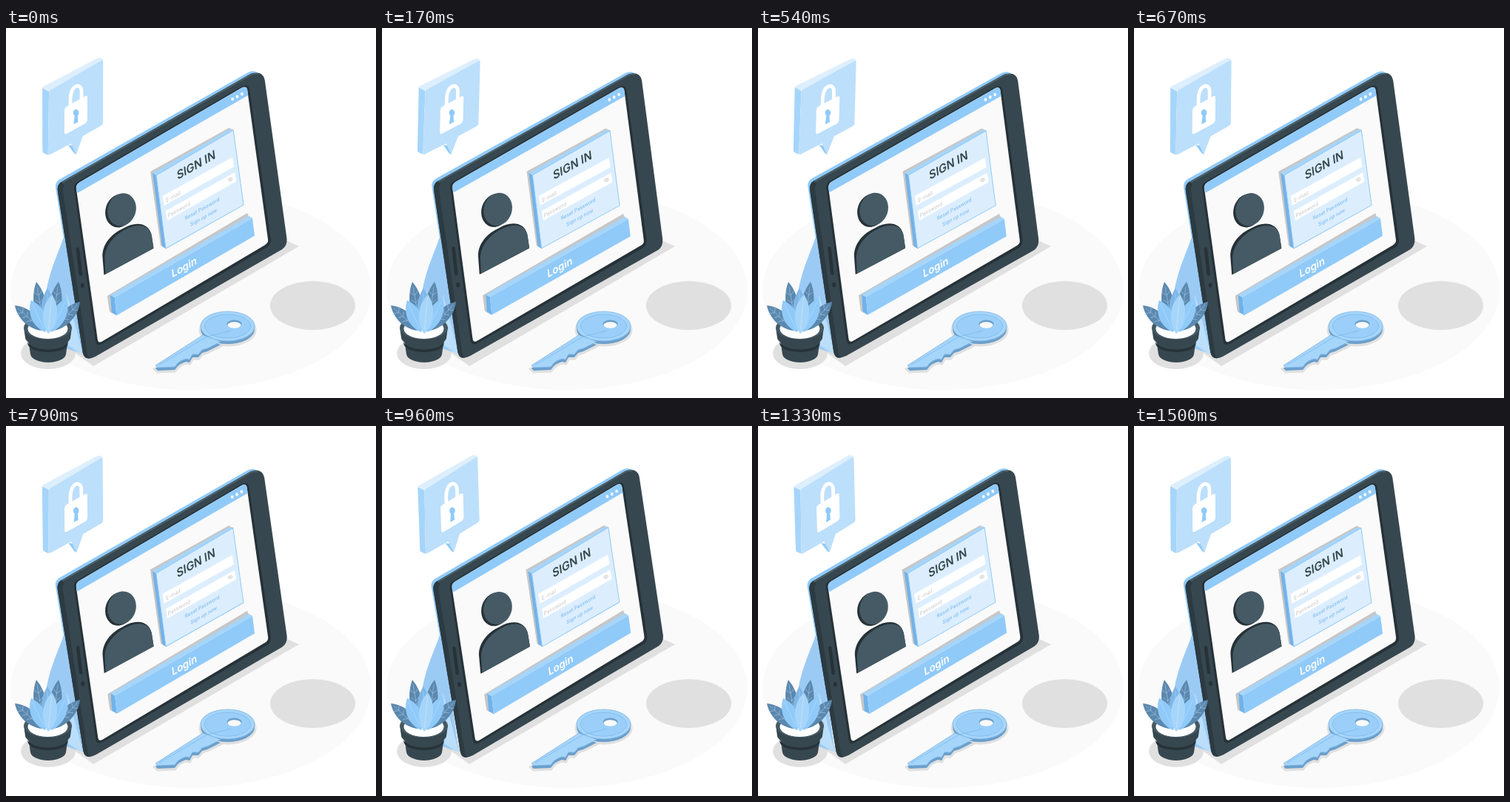
An HTML page for the animation above (1540 ms loop, 500 by 500 pixels).

```html
<!DOCTYPE html>
<html lang="en">
<head>
<meta charset="utf-8">
<title>Sign in</title>
<style>
  html, body { margin: 0; width: 100%; height: 100%; overflow: hidden; background: #fff; }
  svg { display: block; width: 100vw; height: 100vh; }
  text { font-family: Inter, Roboto, sans-serif; }
</style>
</head>
<body>
<svg viewBox="0 0 500 500">
  <ellipse cx="250" cy="354" rx="244" ry="135" fill="#fafafa"/>
  <g fill="#e0e0e0">
    <ellipse cx="414.5" cy="375" rx="57.5" ry="33"/>
    <ellipse cx="57" cy="439.500" rx="37" ry="21.500"/>
    <path d="M92 438 L118 457 L396 295 L376 286 Z"/>
  </g>

  <!-- stand -->
  <path d="M80 276 C74 298 60 322 54 358 L60 425 L90 436 L104 440 Z" fill="#9bcbf5"/>
  <path d="M82 360 L88 380 L104 441 L96 437 L84 429 Z" fill="#bbdefb"/>

  <g id="tablet">
    <path d="M67 216 Q66 209 72 205 L327 60 Q335 56 341 61 L346 70 L80 236 L83 290 L79 290 Z" fill="#90caf9"/>
    <path d="M70 222 Q68 212 75 208 L331 61.500 Q347 57 349.500 70 L379.500 284 Q380.500 294 373 299 L121 444 Q107 451 104 439 Z" fill="#37474f"/>
    <path d="M70 222 Q68 212 75 208 L79 212 Q76 215 77 222 L110 440 Q111 445 115 446 Q106 449 104 439 Z" fill="#2c3a41"/>
    <path d="M76 209 L332 62.500 Q336 61 340 62" fill="none" stroke="#50636c" stroke-width="1.500"/>
    <path d="M92 217 Q91 211 97 208 L318 79 Q328 74 329 84 L358 286 Q358 293 353 296 L130 427 Q122 431 121 423 Z" fill="#263238"/>
    <path d="M95 218 Q94 212 99 209 L318 81 Q325 77 326 84 L354 285 Q355 290 350 293 L131 423 Q125 427 124 421 Z" fill="#fafafa"/>
    <path d="M95.500 221 L95 217 Q95 212 99 209 L318 81 Q325 77 326 84 L327 91 L97 223 Z" fill="#90caf9"/>
    <g fill="#fff">
      <ellipse cx="306" cy="96" rx="1.900" ry="2.200"/>
      <ellipse cx="312.300" cy="92.700" rx="1.900" ry="2.200"/>
      <ellipse cx="318.700" cy="89" rx="1.900" ry="2.200"/>
    </g>
    <path d="M97 299 L101 333" stroke="#263238" stroke-width="4.500" stroke-linecap="round"/>
    <ellipse cx="103.500" cy="348" rx="2.500" ry="3.200" fill="#263238"/>

    <!-- user -->
    <ellipse cx="153.500" cy="247" rx="19" ry="23" transform="rotate(18 153.500 247)" fill="#263238"/>
    <ellipse cx="156.500" cy="245.500" rx="19" ry="22.500" transform="rotate(18 156.500 245.500)" fill="#455a64"/>
    <g transform="translate(.5 .8)">
      <path d="M132 333 L130 309 C129 292 142 277 158 270 C174 260 192 262 196 278 L199 297 Z" fill="#263238"/>
      <path d="M134 332 L133 311 C133 294 145 280 160 272 C176 263 193 264 196.500 280 L199 297 Z" fill="#455a64"/>
    </g>

    <!-- form -->
    <path d="M195 194 L301 135 L308 138 L204 200 L216 298 L209 294 Z" fill="#c7c7c7"/>
    <path d="M198 196 L203 199 L216 298 L211 295 Z" fill="#73b2e8"/>
    <path d="M198 196 L302 137 L307 138 L203 199 Z" fill="#a6d5fa"/>
    <path d="M203 199 L307 138 L321 239 L216 298 Z" fill="#dceefd" stroke="#90caf9" stroke-width="1" stroke-linejoin="round"/>
    <path d="M211.500 227 L306 174.500 L308 187.500 L213.500 240 Z M216 247 L309 195 L311 207.500 L218 260 Z" fill="#fff"/>
    <g id="labels"></g>
    <g fill="none" stroke="#c7c7c7" stroke-width=".8">
      <ellipse cx="303" cy="204.500" rx="3" ry="1.900" transform="rotate(-25 303 204.500)"/>
      <circle cx="303" cy="204.500" r=".8"/>
    </g>

    <!-- button -->
    <path d="M137 362 L326 250 L328 255 L141 363 L144 386 L140 383 Z" fill="#c7c7c7"/>
    <path d="M141 361 L147 364 L149.500 388.500 L143 384.500 Z" fill="#70b2ea"/>
    <path d="M141 361 L328 254 L333 257 L147 364 Z" fill="#a6d5fa"/>
    <path d="M147 364 L333 257 L336 280.500 L149.500 388.500 Z" fill="#90caf9"/>
    <g id="caption"></g>
  </g>

  <g id="bubble">
    <path d="M49 82 Q49 80 51 79 L123 41 Q126 39.500 129 41 L131 43 L58 86 Z" fill="#ddeffd"/>
    <path d="M49 81.500 L58 86 L57 172 L51 169 Q49.500 168 49.500 166 Z" fill="#a6d5fa"/>
    <path d="M84 158 L92 169 L95 171 L97 160 Z" fill="#90caf9"/>
    <path d="M58 88 Q58 85 60 84 L128 44 Q131 42 131 45 L131 128 Q131 130 129 131.500 L104 146 L95 171 L88 156 L60 171 Q57 173 57 169 Z" fill="#bcdffb"/>
    <path d="M87 107 L87 96 C87 76 102 73 102 86 L102 98" fill="none" stroke="#fff" stroke-width="4.800"/>
    <path d="M79 111 Q79 108 82 106 L107 92 Q110 90.500 110 94 L110 124 Q110 127 107 129 L82 143 Q79 144.500 79 141 Z" fill="#fff"/>
    <ellipse cx="94.700" cy="114.500" rx="3.800" ry="4.600" fill="#90caf9"/>
    <path d="M93 116 L96.500 114 L97.500 127 L91.500 130 Z" fill="#90caf9"/>
  </g>

  <g id="plant">
    <path d="M30 420 L33 441 Q34 447 44 450 Q57 454 70 450 Q80 447 81 441 L84 420 Z" fill="#37474f"/>
    <path d="M29 424 C36 438 78 438 84 424 L83 429 C76 441 38 441 30 429 Z" fill="#263238"/>
    <path d="M24 404 L26 419 C30 435 83 435 87 419 L89 404 Z" fill="#37474f"/>
    <ellipse cx="56.500" cy="405" rx="32.500" ry="16" fill="#455a64"/>
    <ellipse cx="56.500" cy="406.500" rx="27" ry="13.500" fill="#fff"/>
    <g id="leaves"></g>
  </g>

  <g id="key"></g>
</svg>
<script>
const LOOP = 1540, LEAD = 25;
const $ = id => document.getElementById(id);

// text lying in the plane of the screen
function label(x, y, size, weight, color, str, anchor = "middle") {
  return `<text transform="matrix(.87 -.495 .13 .99 ${x} ${y})" font-size="${size}"
    font-weight="${weight}" fill="${color}" text-anchor="${anchor}">${str}</text>`;
}

$("labels").innerHTML =
  label(257.5, 190.5, 16, 600, "#37474f", "SIGN IN") +
  label(216.5, 236, 7.5, 400, "#c7c7c7", "E-mail", "start") +
  label(219, 256.5, 7.5, 400, "#c7c7c7", "Password", "start") +
  label(265.5, 246.5, 7, 500, "#7fbdf2", "Reset Password") +
  label(267.5, 258, 7, 500, "#7fbdf2", "Sign up now");
$("caption").innerHTML = label(241.5, 328, 14.5, 600, "#fff", "Login");

// pointed leaf from base to tip, with a midrib and optional side veins
function leaf([bx, by, tx, ty, w], fill, vein, sides) {
  const dx = tx - bx, dy = ty - by, len = Math.hypot(dx, dy);
  const at = (u, v) => {
    const x = bx + dx * u - dy / len * v, y = by + dy * u + dx / len * v;
    return x.toFixed(1) + " " + y.toFixed(1);
  };
  let veins = `M${at(.1, 0)} L${at(.9, 0)}`;
  for (let u = .4; sides && u < .8; u += .16) {
    veins += `M${at(u + .08, -w * .6)} L${at(u, 0)} L${at(u + .08, w * .6)}`;
  }
  return `<path d="M${at(0, 0)} C${at(.2, -w)} ${at(.65, -w * 1.5)} ${at(1, 0)}
    C${at(.65, w * 1.5)} ${at(.2, w)} ${at(0, 0)}" fill="${fill}"/>
    <path d="${veins}" fill="none" stroke="${vein}" stroke-width=".6"/>`;
}

const DARK = ["#5b88ae", "#a9cdea", true];
const MID = ["#7fb6e6", "#a6d5fa", false];
const LIGHT = ["#90caf9", "#bbdefb", false];
const PALE = ["#a6d5fa", "#d3eafd", false];
$("leaves").innerHTML = [
  [[52, 408, 41, 343, 9], DARK], [[62, 408, 71, 343, 9], DARK],
  [[50, 409, 12, 375, 9], DARK], [[64, 409, 100, 370, 9], DARK],
  [[56, 410, 56, 352, 9], MID],
  [[53, 411, 34, 368, 10], LIGHT], [[61, 411, 82, 365, 10], LIGHT],
  [[57, 413, 62, 360, 10], PALE]
].map(([shape, look]) => leaf(shape, ...look)).join("");

const blade = "M202 456 L266 415 L290 424 L272 433 L265 435 L260 441 L252 441 L248 448 L243 447 L236 450 L232 453 L228 458 L205 459 Z";
const body = `<path d="${blade}"/><ellipse cx="299.500" cy="403" rx="36.500" ry="20"/>`;
$("key").innerHTML = `
  <g fill="#e0e0e0" stroke="#e0e0e0" stroke-width="5" transform="translate(0 5)">${body}</g>
  <g fill="#6b9fcb" transform="translate(0 4)">${body}</g>
  <g fill="#a6d5fa" stroke="#7db5e4" stroke-width=".8">${body}</g>
  <path d="M266 416 L289 423.500 L272 432 Z" fill="#a6d5fa"/>
  <ellipse cx="299.500" cy="403" rx="31" ry="16" fill="#9bcff9" stroke="#84bff0" stroke-width="1"/>
  <path d="M207 455 L272 417 L304 409" fill="none" stroke="#84bff0" stroke-width="1"/>
  <ellipse cx="308.500" cy="400" rx="10" ry="5.500" fill="#6b9fcb"/>
  <ellipse cx="308.500" cy="401.500" rx="9" ry="4.200" fill="#fafafa"/>`;

// triangle wave: 0, 1, 0, -1 over one loop
function swing(ms) {
  const p = ((ms + LEAD) / LOOP) % 1;
  return p < .25 ? p * 4 : p < .75 ? 2 - p * 4 : p * 4 - 4;
}

function draw(ms) {
  const s = swing(ms);
  $("tablet").setAttribute("transform", `rotate(${s} 223.5 252.5)`);
  $("bubble").setAttribute("transform", `rotate(${s * 3} 90 106)`);
}

let start;
function tick(now) {
  start ??= now;
  draw(now - start);
  requestAnimationFrame(tick);
}
draw(0);
requestAnimationFrame(tick);
</script>
</body>
</html>
```
